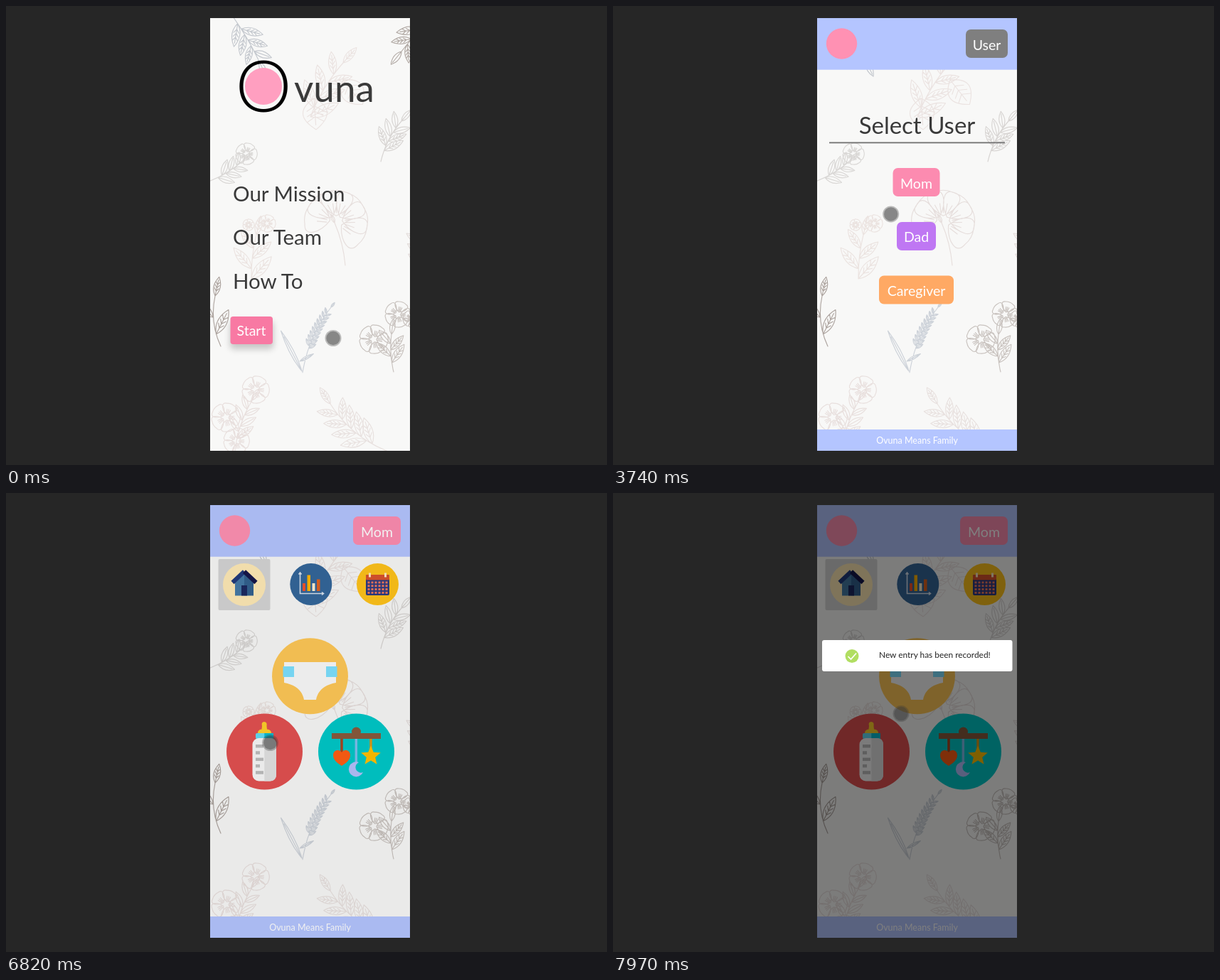
An HTML page that plays this animation: 845 px wide and 646 px high, repeating every 8 s.

```html
<!DOCTYPE html>
<html lang="en">
<head>
<meta charset="utf-8">
<title>Baby log app</title>
<style>
html, body { margin: 0; width: 100%; height: 100%; overflow: hidden; background: #262626; }
svg { display: block; font-family: Lato, "Open Sans", sans-serif; }
.dark { fill: #3a3a3a; }
.mid { text-anchor: middle; }
.btn { fill: #fff; font-size: 19.5px; text-anchor: middle; }
#flora path { fill: none; stroke-width: 1.15; stroke-linejoin: round; stroke-linecap: round; }
</style>
</head>
<body>
<svg width="845" height="646" viewBox="0 0 845 646">
  <defs>
    <clipPath id="phone"><rect x="287" y="17" width="281" height="609"/></clipPath>
    <filter id="shadow" x="-50%" y="-50%" width="200%" height="200%"><feGaussianBlur stdDeviation="5"/></filter>
    <g id="frame">
      <rect x="287" y="17" width="281" height="72.7" fill="#b4c5ff"/>
      <rect x="287" y="596" width="281" height="30" fill="#b4c5ff"/>
      <circle cx="321.5" cy="53" r="21.7" fill="#ff91b3"/>
      <text x="427.5" y="616" class="mid" font-size="12.5" fill="#fff">Ovuna Means Family</text>
    </g>
  </defs>
  <g clip-path="url(#phone)">
    <rect x="287" y="17" width="281" height="609" fill="#f8f8f7"/>
    <g id="flora"></g>

    <g id="home">
      <text x="362" y="149" class="mid" font-size="100" font-weight="300">O</text>
      <circle cx="362" cy="113" r="26" fill="#ff9fc0"/>
      <text x="405" y="135" class="dark" font-size="53">vuna</text>
      <g class="dark" font-size="29.5">
        <text x="319" y="275">Our Mission</text>
        <text x="319" y="336">Our Team</text>
        <text x="319" y="398">How To</text>
      </g>
      <rect x="315" y="444" width="61" height="39" rx="5" opacity=".2" filter="url(#shadow)"/>
      <rect x="315.5" y="437" width="59.5" height="39" rx="4" fill="#f879a3"/>
      <text x="345" y="464" class="btn">Start</text>
    </g>

    <g id="select">
      <use href="#frame"/>
      <rect x="496" y="33" width="59" height="40" rx="7" fill="#7f7f7f"/>
      <text x="525.5" y="62" class="btn">User</text>
      <text x="427.5" y="179.5" class="dark mid" font-size="33">Select User</text>
      <rect x="304" y="191.5" width="247" height="1.8" fill="#717171"/>
      <rect x="393.5" y="228" width="66" height="40" rx="7" fill="#fc8bb0"/>
      <text x="426.5" y="257" class="btn">Mom</text>
      <rect x="399" y="304" width="55" height="40" rx="7" fill="#bf77f3"/>
      <text x="426.5" y="332" class="btn">Dad</text>
      <rect x="374" y="379.5" width="105" height="40" rx="7" fill="#ffa964"/>
      <text x="426.5" y="408" class="btn">Caregiver</text>
    </g>

    <g id="log">
      <use href="#frame"/>
      <rect x="488" y="33" width="67" height="40" rx="7" fill="#fd8db1"/>
      <text x="521.5" y="62" class="btn">Mom</text>

      <rect x="298.5" y="93" width="73" height="72" rx="2" fill="#d5d5d5"/>
      <circle cx="335" cy="129" r="30" fill="#ffeab6"/>
      <path d="M322 124L335 112V144.5H322Z" fill="#457aa6"/>
      <path d="M335 112L348 124V144.5H335Z" fill="#33618f"/>
      <path d="M331 130H339V144.5H331Z" fill="#1c2960"/>
      <path d="M318.5 126L335 110.5" stroke="#213a7c" stroke-width="6"/>
      <path d="M335 110.5L351.5 126" stroke="#15164a" stroke-width="6"/>

      <circle cx="428.8" cy="128.5" r="29.5" fill="#34679a"/>
      <path d="M413.5 112V141.5H446M411.5 114.5L413.5 112L415.5 114.5M444 139.5L446.5 141.5L444 143.5" fill="none" stroke="#d8e2ee" stroke-width="1.6"/>
      <path d="M417 127h4v11h-4z" fill="#f0532d"/>
      <path d="M423.5 115.5h4.5v22.5h-4.5z" fill="#ffb400"/>
      <path d="M430.5 127h4v11h-4z" fill="#fff0cf"/>
      <path d="M437 121.5h4.5v16.5h-4.5z" fill="#e0621f"/>

      <circle cx="522.5" cy="128.5" r="29.5" fill="#ffc31a"/>
      <rect x="506" y="115" width="33" height="29" rx="2" fill="#2b3b82"/>
      <rect x="506" y="115" width="33" height="7.5" rx="1.5" fill="#d9532c"/>
      <path d="M510 112.5h3v6h-3zM532 112.5h3v6h-3z" fill="#ffe9c4"/>
      <g id="days" fill="#f2795c"></g>

      <circle cx="427.5" cy="257.8" r="53.5" fill="#ffc857"/>
      <path d="M391 238H464V267C447 270 438 279 436 291H419C417 279 408 270 391 267Z" fill="#fafafa"/>
      <path d="M389.5 244h15.5v15h-15.5zM450 244h15.5v15h-15.5z" fill="#7de0ff"/>

      <circle cx="363.5" cy="364" r="53.5" fill="#e25050"/>
      <path d="M354 338Q354 333 359.5 332.5L360 328Q358.5 322 363 322Q367.5 322 366.5 328L367 332.5Q373 333 373 338Z" fill="#ffd02a"/>
      <rect x="351" y="338" width="25" height="8" rx="2" fill="#62dcf4"/>
      <path d="M363.3 338H376V346H363.3Z" fill="#08bcd2"/>
      <rect x="346.5" y="345" width="33.5" height="60.5" rx="9" fill="#f8f8f8"/>
      <path d="M363.3 345H371Q380 345 380 354V396.5Q380 405.5 371 405.5H363.3Z" fill="#e2e2e2"/>
      <g id="marks" fill="#bdbdbd"></g>

      <circle cx="492.5" cy="364" r="53.5" fill="#00c8c8"/>
      <circle cx="492.5" cy="336" r="6.5" fill="#8a5a3c"/>
      <rect x="458" y="338" width="69" height="8" fill="#8a5a3c"/>
      <path d="M472 346V366" stroke="#a9451f" stroke-width="3.5"/>
      <path d="M492.3 346V381" stroke="#7cc0ee" stroke-width="3.5"/>
      <path d="M513 346V360" stroke="#d69a1c" stroke-width="3.5"/>
      <path d="M472 384C462 378 460 373 460 369C460 361 469 360 472 365C475 360 484 361 484 369C484 373 482 378 472 384Z" fill="#ff5e14"/>
      <path d="M496 379A10.5 10.5 0 1 0 502 393A7.5 7.5 0 1 1 496 379Z" fill="#b4c0fb"/>
      <path id="star" fill="#ffbf00"/>
    </g>

    <rect id="shade" x="287" y="17" width="281" height="609"/>
    <g id="toast">
      <rect x="294" y="207" width="267.5" height="44" rx="3" fill="#fff"/>
      <circle cx="336" cy="229.5" r="9.5" fill="#b1de62"/>
      <path d="M330.5 230L334.5 234L342 225.5" fill="none" stroke="#fff" stroke-width="1.7"/>
      <text x="374" y="232" font-size="11.9" fill="#222">New entry has been recorded!</text>
    </g>
    <g id="touch" fill="#3a3a3a">
      <circle r="11.5" fill-opacity=".32"/>
      <circle r="9.7" fill-opacity=".4"/>
    </g>
  </g>
</svg>
<script>
const el = id => document.getElementById(id);
const pt = (x, y) => `${x.toFixed(1)} ${y.toFixed(1)} `;
const polar = (x, y, a, r) => pt(x + r * Math.cos(a), y + r * Math.sin(a));
const range = n => [...Array(n).keys()];
const join = (n, f) => range(n).map(f).join('');

function draw(color, ...paths) {
  el('flora').insertAdjacentHTML('beforeend', `<path d="${paths.join('')}" stroke="${color}"/>`);
}

// Leaf growing from (x,y) at angle a, with a midrib and side veins
function leaf(x, y, a, len, w = len * .17) {
  const at = (u, v) => pt(x + len * u * Math.cos(a) - v * Math.sin(a), y + len * u * Math.sin(a) + v * Math.cos(a));
  const vein = i => `M${at(.4 + i * .17, w * .65)}L${at(.25 + i * .17, 0)}L${at(.4 + i * .17, -w * .65)}`;
  return `M${at(0, 0)}Q${at(.45, 2 * w)}${at(1, 0)}Q${at(.45, -2 * w)}${at(0, 0)}L${at(.85, 0)}` + (w > 4.5 ? join(3, vein) : '');
}

// Curved stem with n pairs of leaves that shrink towards a tip leaf
function sprig(x, y, X, Y, bend, n, len, from = .25) {
  const dx = X - x, dy = Y - y, d = Math.hypot(dx, dy);
  const cx = x + dx / 2 + dy / d * bend, cy = y + dy / 2 - dx / d * bend;
  const mix = (a, c, b, u) => a * (1 - u) ** 2 + 2 * c * u * (1 - u) + b * u * u;
  const grow = (u, turn) => {
    const a = Math.atan2((cy - y) * (1 - u) + (Y - cy) * u, (cx - x) * (1 - u) + (X - cx) * u);
    return leaf(mix(x, cx, X, u), mix(y, cy, Y, u), a + turn, len * (1 - .35 * u));
  };
  const pair = i => grow(from + (.92 - from) * i / n, .75) + grow(from + (.92 - from) * (i + .5) / n, -.75);
  return `M${pt(x, y)}Q${pt(cx, cy)}${pt(X, Y)}` + join(n, pair) + grow(1, 0);
}

// Fan-shaped petal opening from (x,y) towards angle a
function petal(x, y, a, r) {
  const p = (b, k) => polar(x, y, a + b, r * k);
  return `M${p(0, .2)}C${p(-.85, .6)}${p(-.7, 1.15)}${p(-.3, 1)}Q${p(0, 1.08)}${p(.3, 1)}C${p(.7, 1.15)}${p(.85, .6)}${p(0, .2)}` +
    join(3, i => `M${p(i * .25 - .25, .3)}L${p(i * .2 - .2, .6)}`);
}

const bloom = (x, y, r) => join(5, i => petal(x, y, i * 1.257 - 1.2, r));

draw('#c4c8ce', sprig(314, 8, 356, 78, 4, 3, 36));
draw('#ebe3e1', sprig(428, 156, 474, 80, 8, 3, 44, 0), leaf(433, 130, 1.5, 44, 17), leaf(474, 104, .9, 44, 16));
draw('#b3aba6', sprig(590, 22, 556, 64, 0, 2, 36));
draw('#d8d5d3', sprig(527, 219, 556, 162, 8, 3, 33));
draw('#d9d7d5', sprig(285, 247, 333, 218, -5, 3, 27), bloom(338, 208, 15));
draw('#e6dedc', sprig(477, 365, 462, 305, -5, 0, 20), join(6, i => petal(464, 304, i * .68 - 2.9, 44)));
draw('#ebe3e0', sprig(345, 384, 352, 322, 4, 2, 42, 0), bloom(341, 308, 8), bloom(367, 306, 12));
draw('#e3dcda', sprig(596, 392, 580, 320, 0, 3, 34));
draw('#ada49f', sprig(302, 479, 294, 408, 12, 1, 42));
draw('#cdd2d9', sprig(417, 516, 457, 424, 13, 9, 13, .35), leaf(416, 514, -2.05, 64, 3), leaf(413, 500, -.5, 22, 2));
draw('#c9c3bf', sprig(545, 515, 542, 462, 5, 2, 34), bloom(517, 469, 20), bloom(551, 434, 18), bloom(570, 440, 12));
draw('#e8dfdd', sprig(322, 626, 346, 555, 8, 3, 30), bloom(351, 540, 19), bloom(309, 579, 20), bloom(324, 612, 18));
draw('#e8e1df', sprig(540, 628, 456, 560, 18, 4, 42));

el('days').innerHTML = join(24, i =>
  `<rect x="${508.5 + i % 6 * 5}" y="${124.5 + (i / 6 | 0) * 4.8}" width="3" height="2.9"/>`);
el('marks').innerHTML = join(5, i =>
  `<rect x="351" y="${354 + i * 9.3}" width="${i % 2 ? 6 : 11}" height="4.5"/>`);
el('star').setAttribute('d', 'M' + range(10).map(i =>
  polar(513, 370, i * Math.PI / 5 - Math.PI / 2, i % 2 ? 6.5 : 14.5)).join('L') + 'Z');

const ramp = (t, a, b) => Math.min(1, Math.max(0, (t - a) / (b - a)));
const show = (id, v) => el(id).setAttribute('opacity', v);
const place = (id, x, y) => el(id).setAttribute('transform', `translate(${x} ${y})`);

// Touch moves: start, end, target x, y, and bend of the path in x, y
const moves = [
  [650, 1825, 332.5, 459.5, 0, .2],
  [2850, 4235, 428.5, 248, -.5, .38],
  [5050, 6245, 371.5, 351.5, .65, .28],
  [7010, 7985, 405, 310.5, 0, 0]
];

function tick(now) {
  const t = now % 8000;
  show('home', t < 2190 ? 1 : 0);
  show('select', t < 2190 || t >= 4480 ? 0 : ramp(t, 2160, 2370));
  show('log', t < 4480 ? 0 : ramp(t, 4450, 4640));
  show('shade', .5 * ramp(t, 6805, 6955));
  show('toast', ramp(t, 6920, 7080));
  place('toast', 0, -50 * (1 - ramp(t, 6920, 7220)) ** 1.8);

  let x = 460, y = 467.5;
  for (const [a, b, X, Y, bx, by] of moves) {
    const u = ramp(t, a, b), s = u * u * (3 - 2 * u), bend = s * (1 - s);
    x += (X - x) * (s + bx * bend);
    y += (Y - y) * (s + by * bend);
  }
  place('touch', x, y);
  requestAnimationFrame(tick);
}
requestAnimationFrame(tick);
</script>
</body>
</html>
```
